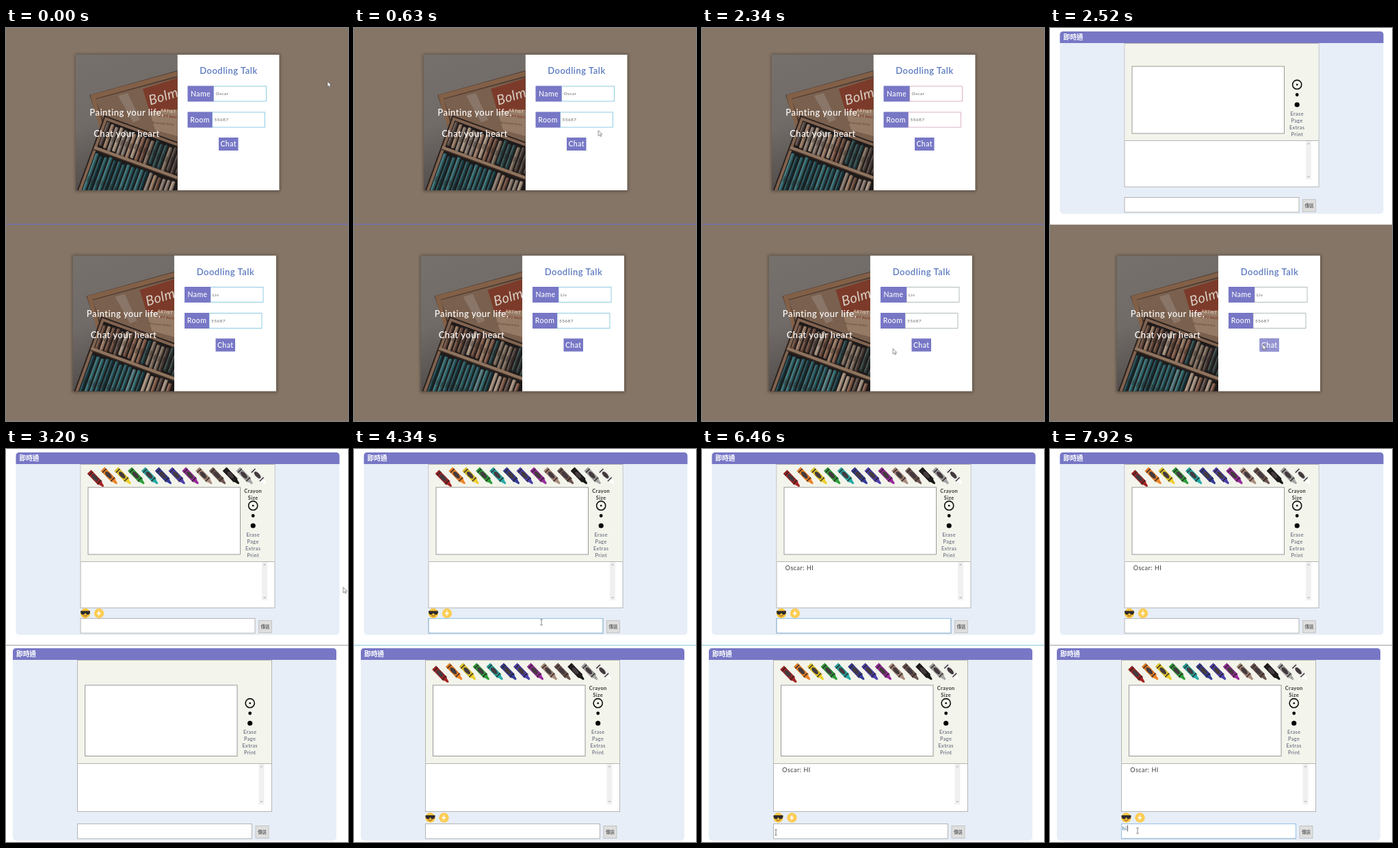
Write an HTML page that moves like this. It is 500x574 px and loops after 8000 ms.

```html
<!DOCTYPE html>
<html lang="zh-Hant">
<head>
<meta charset="utf-8">
<title>Chat demo</title>
<style>
html, body { margin: 0; width: 100%; height: 100%; overflow: hidden; background: #fff; }
svg { display: block; width: 500px; height: 574px; font-family: Lato, "Noto Sans CJK TC", "Noto Sans CJK", sans-serif; letter-spacing: .4px; }
.timed { animation: 8s step-end infinite; }
.mid { text-anchor: middle; }
.brown { fill: #857566; }
.purple { fill: #7777c6; }
.slogan { text-anchor: middle; fill: #fff; font-weight: 500; letter-spacing: .5px; }
.label { text-anchor: middle; fill: #fff; font-weight: 500; }
.line { fill: #fff; stroke: #b4b4b4; }
.field { fill: #fff; animation: 8s step-end infinite; }
.top .field { animation-name: pink; }
.low .field { animation-name: grey; }
@keyframes pink { 0% { stroke: #8fcce2; } 10.75% { stroke: #dcb2c8; } }
@keyframes grey { 0% { stroke: #8fcce2; } 20.5% { stroke: #b2beb8; } }
#divider { animation: divider 8s step-end infinite; }
@keyframes divider {
  0% { fill: #7272c4; } 31.5% { fill: #fff; } 39.8% { fill: #aaa; }
  47.375% { fill: #96d2e0; } 90.25% { fill: #aaa; }
}
#cursor { animation: travel 8s infinite; }
@keyframes travel {
  0%, .3% { transform: translate(470px, 78px); animation-timing-function: steps(9); }
  8.875%, 19.538% { transform: translate(325px, 170px); animation-timing-function: steps(3); }
  22.425% { transform: translate(56.5px, 512px); animation-timing-function: steps(8); }
  30.125%, 31.5% { transform: translate(311px, 462px); animation-timing-function: steps(4); }
  35%, 36.925% { transform: translate(440px, 360px); animation-timing-function: steps(3); }
  39.775% { transform: translate(493px, 202px); animation-timing-function: steps(8); }
  47.375%, 76.9% { transform: translate(274px, 253px); animation-timing-function: steps(4); }
  80.65% { transform: translate(108px, 560px); animation-timing-function: steps(3); }
  83.625%, 86.49% { transform: translate(127.5px, 557px); animation-timing-function: step-end; }
  86.5%, 100% { transform: translate(128px, 557.5px); }
}
</style>
</head>
<body>
<svg id="stage" viewBox="0 0 500 574" xmlns="http://www.w3.org/2000/svg"></svg>
<script>
const LOOP = 8000;
let css = '', count = 0;

// Wraps markup so that it is seen only during the given [from, to] spans in ms.
function show(body, ...spans) {
  const name = 'show' + count++;
  const steps = spans.map(([a, b]) =>
    `${a / LOOP * 100}%{visibility:visible}${b / LOOP * 100}%{visibility:hidden}`).join('');
  css += `@keyframes ${name}{0%{visibility:hidden}${steps}}`;
  return `<g class="timed" style="animation-name:${name}">${body}</g>`;
}
const rect = (x, y, w, h, attrs = '') => `<rect x="${x}" y="${y}" width="${w}" height="${h}" ${attrs}/>`;
const dot = (x, y, r, attrs = '') => `<circle cx="${x}" cy="${y}" r="${r}" ${attrs}/>`;
const path = (d, attrs = '') => `<path d="${d}" ${attrs}/>`;
const text = (x, y, str, size, attrs = '') =>
  `<text x="${x}" y="${y}" dy=".35em" font-size="${size}" ${attrs}>${str}</text>`;
const list = (n, f) => Array.from({ length: n }, (_, i) => f(i)).join('');
const at = (x, y, body, attrs = '') => `<g transform="translate(${x} ${y})" ${attrs}>${body}</g>`;

let seed = 7;
const random = () => (seed = seed * 16807 % 2147483647) / 2147483647;
const pick = colors => colors[Math.floor(random() * colors.length)];

function sticks(n, y, length, palette) {
  return list(n, i => {
    const x = 5 + i * 7, top = y + random() * 4;
    return rect(x, top, 5, length, `rx="1.5" fill="${pick(palette(i))}"`) +
      rect(x + .6, top + 1.5, 1.2, length - 4, 'fill="#fff" opacity=".2"') +
      rect(x + 3.6, top, 1.4, length, 'fill="#000" opacity=".3"') +
      rect(x + 1, top + length * .4, 3, 8, 'fill="#2a2320" opacity=".35"');
  });
}

function photo() {
  const warm = ['#7c5745', '#94755f', '#66483a', '#85756a', '#a18c7a', '#55463f'];
  const cool = ['#1f4a50', '#2f6469', '#173a40', '#4d7679', '#25565c'];
  const dark = ['#2c3836', '#473b35', '#274143', '#796859'];
  const lid = path('M20 59L149 23V160L45 132Z', 'fill="#4b3930"') +
    path('M21 59L149 24V31L29 64L47 130L41 128Z', 'fill="#826047"') +
    path('M29 65L149 33V150L48 118Z', 'fill="#7a604e"') +
    path('M62 60L76 56L94 95L84 99Z', 'fill="#95867a" opacity=".6"') +
    path('M98 50L149 34V82L108 83Z', 'fill="#7c3b2a"') +
    path('M108 83L149 80V119L116 110Z', 'fill="#957b66"');
  const print = `<g transform="translate(107 67) rotate(-17)" fill="#d9d0c6">` +
      text(0, 0, 'Bolmer', 20, 'font-style="italic"') + '</g>' +
    `<g transform="translate(124 81) rotate(6)" fill="#e6cfbc">` +
      text(0, 0, 'ARTIST', 6, 'font-weight="700"') +
      text(-2, 8, 'SOFT PASTELS', 5, 'font-weight="700" fill="#7c3525"') +
      text(-10, 19, 'Assorted Artist', 4, 'fill="#4e3829"') + '</g>';
  const tray = `<g transform="translate(43 91) rotate(20)">` +
    rect(-2, -2, 140, 170, 'fill="#2c221e"') + rect(0, 0, 140, 160, 'fill="#806350"') +
    rect(4, 4, 135, 156, 'fill="#1e1a1a"') +
    sticks(18, 5, 37, i => i < 10 ? warm : dark) +
    rect(0, 45, 140, 4.5, 'fill="#8f735e"') + rect(0, 49.5, 140, 1.5, 'fill="#3c2d25"') +
    sticks(18, 52, 90, i => i < 12 ? cool : warm) + '</g>';
  return `<g clip-path="url(#photo)">` + rect(0, 0, 149, 198, 'fill="url(#wall)"') +
    lid + print + tray + '</g>';
}

function login(x, y, side, name, hover) {
  const field = (top, label, w, value) =>
    rect(w + 163.5, top + .5, 77, 22, 'class="field"') + rect(163.5, top, w, 23, 'class="purple"') +
    text(163.5 + w / 2, top + 11.5, label, 10.5, 'class="label"') +
    text(w + 166.5, top + 11.5, value, 6.5, 'fill="#666"');
  return at(x, y,
    rect(-1, -1, 300, 201, 'fill="#000" opacity=".3" filter="url(#soft)"') +
    rect(148.5, 0, 149, 198, 'fill="#fff"') + photo() +
    text(74.5, 84.5, 'Painting your life,', 13, 'class="slogan"') +
    text(74.5, 115.5, 'Chat your heart', 13, 'class="slogan"') +
    text(223.5, 23.5, 'Doodling Talk', 13, 'class="mid" fill="#5b7abf" font-weight="600" letter-spacing=".5"') +
    field(45.5, 'Name', 38, name) + field(83.5, 'Room', 36, '55687') +
    rect(209, 121, 28.5, 19, 'class="purple"') +
    show(rect(209, 121, 28.5, 19, 'fill="#9494d2"'), hover) +
    text(223.2, 130.5, 'Chat', 10.5, 'class="label"'),
    `class="${side}"`);
}

const CRAYONS = ['#a32424', '#ee8428', '#ecd02c', '#2d9e3a', '#25aaa6', '#333b98', '#4b3fae',
  '#962a9c', '#a98b7c', '#6d5650', '#161616', '#a5a5a5', '#fff'];

const crayons = () => CRAYONS.map((color, i) =>
  `<g transform="translate(${117.5 + i * 19.8} ${i ? 35 : 39}) rotate(46)">` +
  path('M-15 -4H8L9 -2.6L15 -1.2V1.2L9 2.6L8 4H-15Z', `fill="${color}"`) +
  rect(-15, -4, 23, 8, 'fill="#3a2c2c" opacity=".1"') +
  path('M-11.5 -4V4M6 -4V4', 'stroke="#2b2424" stroke-width="1.3"') +
  '<ellipse cx="-2.8" rx="6.3" ry="3" fill="#433a3e"/></g>').join('');

const emoji = y =>
  dot(101.5, y, 7.2, 'fill="#fbc53f"') +
  path(`M94.5 ${y - 3.5}h14v2q-1 4 -4 3.5q-2.5 -.5 -3 -3q-.5 2.5 -3 3q-3 .5 -4 -3.5z`, 'fill="#2d2a2e"') +
  path(`M98.5 ${y + 3.3}q3 2 6 -.5`, 'fill="none" stroke="#7a4a1c"') +
  dot(121.5, y, 7.2, 'fill="#fbcc55"') +
  path(`M122.5 ${y - 5}l-4.5 6h3l-1 4l4.5 -6h-3z`, 'fill="#fff"');

// k is 0 for the upper window and 1 for the slightly taller lower one.
function chat(x, y, k, images, sent, focus, entry) {
  const split = 159.5 + 9 * k, end = 227 + 11.5 * k, input = 242.5 + 14 * k, shift = 2.5 * k;
  const bar = split + .5, barH = 56 + 3 * k;
  const tool = (str, row, attrs) => text(346.7, row + shift, str, 7.4, `class="mid" ${attrs}`);
  const caret = (cx, ...spans) => show(rect(cx, input + 2, .8, 9, 'fill="#333"'), ...spans);
  const typed = (str, from, to, color) =>
    show(text(95.5, input + 6.7, str, 8, `fill="${color}"`), [from, to]);
  return at(x, y,
    rect(0, 0, 473, 266.5 + 14.5 * k, 'rx="5" fill="#e7eef7"') +
    path('M0 17V5Q0 0 5 0H468Q473 0 473 5V17Z', 'class="purple"') +
    text(5, 8.7, '即時通', 9.7, 'fill="#fff" font-weight="700" letter-spacing="0"') +
    rect(94.5, 17.5, 284, end - 17.5, 'class="line"') +
    rect(95, 18, 283, split - 18, 'fill="#f3f4eb"') +
    path(`M95 ${split}H378`, 'stroke="#b4b4b4"') +
    rect(105.5, 51 + 3 * k, 222.5, 98 + 5.5 * k, 'fill="#fff" stroke="#999"') +
    dot(346.7, 77.7 + shift, 6.6, 'fill="none" stroke="#111" stroke-width="1.6"') +
    dot(346.7, 77.7 + shift, 1.3) + dot(346.7, 92.5 + shift, 2.4) + dot(346.7, 107 + shift, 3.6) +
    ['Erase', 'Page', 'Extras', 'Print'].map((s, i) => tool(s, 120.2 + i * 10, 'fill="#535a70"')).join('') +
    rect(359.5, bar, 8, barH, 'fill="#f0f0f0"') +
    path(`M362 ${bar + 5}l1.5 -2l1.5 2M362 ${bar + barH - 5}l1.5 2l1.5 -2`, 'fill="none" stroke="#aaa"') +
    show(crayons() + emoji(235 + 12.5 * k) +
      tool('Crayon', 56, 'font-weight="700" fill="#333"') +
      tool('Size', 66, 'font-weight="700" fill="#333"'), [images, LOOP]) +
    show(text(107.3, split + 9.7, 'Oscar: HI', 9, 'fill="#3a3a3a" letter-spacing=".5"'), [sent, LOOP]) +
    rect(94.5, input, 255, 21.5, 'class="line"') +
    show(rect(94.5, input, 255, 21.5, 'fill="none" stroke="#93c2e6"'), focus) +
    rect(355, 245.5 + 14 * k, 19, 18, 'fill="#dedede" stroke="#c4c4c4"') +
    text(364.5, 254.7 + 14 * k, '傳送', 6.4, 'class="mid" fill="#333" letter-spacing="0"') +
    entry(caret, typed));
}

const upper = chat(14.5, 5, 0, 2660, 5980, [3790, 7220], (caret, typed) =>
  caret(96.5, [3790, 4340], [4890, 5360]) +
  typed('H', 5360, 5520, '#333') + caret(102.5, [5360, 5520]) +
  typed('HI', 5520, 5980, '#333') + caret(105.5, [5520, 5980]));
const lower = chat(10, 291, 1, 3330, 6060, [7220, LOOP], (caret, typed) =>
  caret(96.5, [7220, 7620]) +
  typed('h', 7620, 7770, '#2b6690') + caret(100.8, [7620, 7770]) +
  typed('hi', 7770, LOOP, '#2b6690') + caret(103.2, [7770, LOOP]));

const arrow = path('M0 0V8L1.9 6.3L3.2 9L4.5 8.4L3.3 5.8H5.6Z',
  'fill="#fff" stroke="#444" stroke-width=".6"');
const beam = path('M-1.8 -4H1.8M0 -4V4M-1.8 4H1.8', 'fill="none" stroke="#777" stroke-width=".9"');

document.getElementById('stage').innerHTML =
  `<defs>
    <clipPath id="photo">${rect(0, 0, 148.5, 198)}</clipPath>
    <linearGradient id="wall" x2=".3" y2="1">
      <stop stop-color="#76716d"/><stop offset=".5" stop-color="#716b68"/><stop offset="1" stop-color="#4e4947"/>
    </linearGradient>
    <filter id="soft"><feGaussianBlur stdDeviation="2"/></filter>
  </defs>` +
  show(rect(0, 0, 500, 287, 'class="brown"') + login(102, 39, 'top', 'Oscar', [710, 1640]), [0, 2520]) +
  show(upper, [2520, LOOP]) +
  show(rect(0, 287, 500, 287, 'class="brown"') + login(97.5, 332.5, 'low', 'Liv', [2410, 2590]), [0, 3190]) +
  show(lower, [3190, LOOP]) +
  rect(0, 286, 500, 1.2, 'id="divider"') +
  `<g id="cursor">${show(arrow, [0, 3790], [6229, 6450])}${show(beam, [3790, 6229], [6450, LOOP])}</g>`;

const style = document.createElement('style');
style.textContent = css;
document.head.append(style);
</script>
</body>
</html>
```
